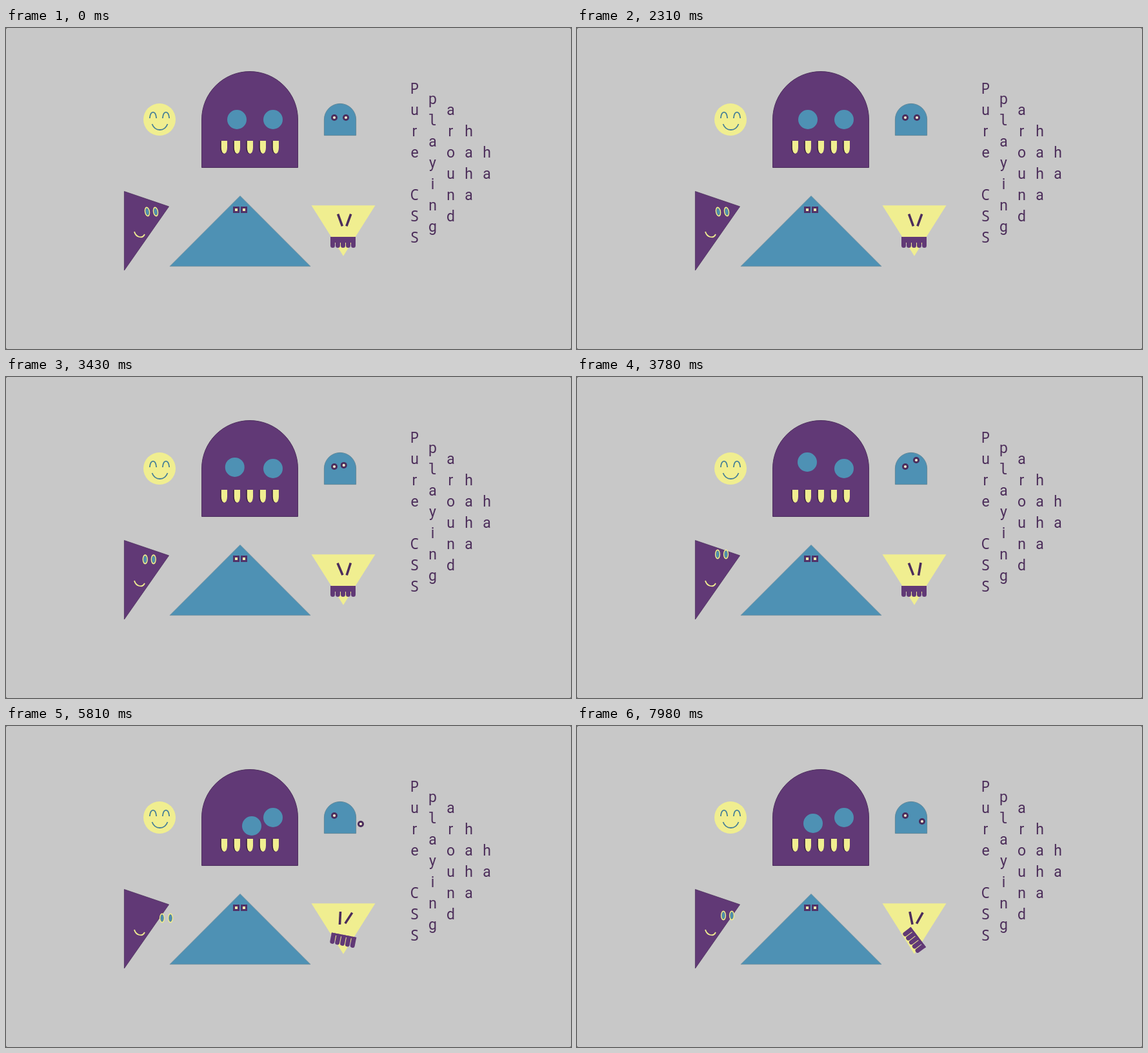
An HTML page with a canvas that plays this animation: 876x498 px, repeating every 8000 ms.

```html
<!DOCTYPE html>
<html lang="en">
<head>
<meta charset="utf-8">
<title>Shape faces</title>
<style>
  html, body { margin: 0; width: 100%; height: 100%; overflow: hidden; background: #c8c8c8; }
  canvas { display: block; }
</style>
</head>
<body>
<canvas id="stage" width="876" height="498"></canvas>
<script>
const ctx = document.getElementById('stage').getContext('2d');
const LOOP = 8000, STEP = 70;
const BACK = '#c8c8c8', PURPLE = '#613976', BLUE = '#4e91b4', YELLOW = '#f0ee90';
const DARK = '#4b2c5c', INK = '#4d2f5b';

// Pointer offset over time: [ms, x, y]
const PATH = [
  [2450, 0, 0], [2940, -7, 11], [3780, -1, -10],
  [4720, 23, 13], [6860, 23, 13], [7980, 8, 9]
];

function offsetAt(t) {
  if (t <= PATH[0][0]) return [0, 0];
  for (let i = 1; i < PATH.length; i++) {
    const [t0, x0, y0] = PATH[i - 1], [t1, x1, y1] = PATH[i];
    if (t <= t1) {
      const p = (t - t0) / (t1 - t0);
      const k = p * p * (3 - 2 * p);
      return [x0 + (x1 - x0) * k, y0 + (y1 - y0) * k];
    }
  }
  return PATH[PATH.length - 1].slice(1);
}

const rad = deg => deg * Math.PI / 180;

function paint(fill, line, width = 1) {
  if (fill) { ctx.fillStyle = fill; ctx.fill(); }
  if (line) { ctx.strokeStyle = line; ctx.lineWidth = width; ctx.stroke(); }
}

function oval(x, y, rx, ry, fill, line, width) {
  ctx.beginPath();
  ctx.ellipse(x, y, rx, ry, 0, 0, Math.PI * 2);
  paint(fill, line, width);
}

function poly(points, fill, line) {
  ctx.beginPath();
  points.forEach(([x, y]) => ctx.lineTo(x, y));
  ctx.closePath();
  paint(fill, line, 0.8);
}

function curve(x0, y0, cx0, cy0, cx1, cy1, x1, y1, color) {
  ctx.beginPath();
  ctx.moveTo(x0, y0);
  ctx.bezierCurveTo(cx0, cy0, cx1, cy1, x1, y1);
  paint(null, color, 1.8);
}

function box(x, y, w, h, radii, fill, line) {
  ctx.beginPath();
  ctx.roundRect(x, y, w, h, radii);
  paint(fill, line);
}

function turned(x, y, deg, draw) {
  ctx.save();
  ctx.translate(x, y);
  ctx.rotate(rad(deg));
  draw();
  ctx.restore();
}

function smiley() {
  const line = '#467f98';
  oval(238, 142, 25, 25, YELLOW);
  for (const x of [228, 248]) curve(x - 5.2, 140, x - 4, 127.5, x + 4, 127.5, x + 5.2, 140, line);
  curve(226.5, 149, 231, 161, 246, 161, 250.5, 149, line);
}

function skull(dx, dy) {
  box(303.5, 67.5, 149, 149, [74.5, 74.5, 0, 0], PURPLE, '#4c2e5c');
  oval(358 + dx, 142 + dy, 15, 15, BLUE);
  oval(414, 142, 15, 15, BLUE);
  for (let x = 333; x < 420; x += 20) {
    const shape = [0, 0, { x: 5, y: 10 }, { x: 5, y: 10 }];
    box(x - 1, 175, 10, 20, shape, '#3d2148');
    box(x + 0.8, 175, 9.2, 20, shape, YELLOW);
  }
}

function ghost(dx, dy) {
  box(493.4, 117.4, 49.2, 49.2, [24.6, 24.6, 0, 0], BLUE, '#5f8799');
  for (const [x, y] of [[509, 139], [527 + dx, 139 + dy]]) {
    oval(x, y, 5, 5, DARK);
    oval(x, y, 2.1, 2.1, '#f3efd0');
  }
}

function wedge(dx, dy, tilt) {
  poly([[183.4, 253.5], [252.5, 277], [183.4, 376]], PURPLE, '#4c2e5c');
  curve(199, 316, 201, 324, 211, 328, 215, 320, YELLOW);
  for (const x of [219, 232]) turned(x + dx, 285 + dy, tilt, () => {
    oval(0, 0, 4.1, 7.6, YELLOW);
    oval(0, 0, 2.2, 5.4, BLUE, '#45677c', 0.7);
  });
}

function mountain() {
  poly([[363, 260.5], [472, 369.7], [254, 369.7]], BLUE, '#6b8d9c');
  for (const x of [352, 364]) {
    box(x, 277, 10, 10, 0, '#513268');
    box(x + 3, 280, 4, 4, 0, '#f3efb0');
  }
}

function comb(angle, notch) {
  turned(522.5, 332.5, angle, () => {
    box(-19.5, -8.5, 39, notch, 0, PURPLE);
    for (let i = 0; i < 5; i++) box(-19.5 + i * 8, -8.5, 7, 17, [0, 0, 3.5, 3.5], PURPLE);
  });
}

function grump(dx, dy, t) {
  poly([[473.5, 275.2], [572.5, 275.2], [523, 353.8]], YELLOW);
  const brow = () => box(-1.8, -10, 3.6, 20, 0, DARK);
  turned(518, 298, dx - 20, brow);
  turned(531.3, 298, dy + 20, brow);
  const angle = Math.max(0, (t - 5240) * 0.0193);
  comb(angle, t < 4500 ? 9 : 3);
}

function column(word, x, y) {
  [...word].forEach((c, i) => {
    const face = /[A-Z]/.test(c) ? '"Noto Sans Mono"' : c === 'l' ? '"DejaVu Sans Mono"' : 'Roboto';
    ctx.font = `23px ${face}, sans-serif`;
    ctx.fillText(c, x, y + i * 33);
  });
}

function words() {
  ctx.fillStyle = INK;
  ctx.textAlign = 'center';
  ctx.textBaseline = 'alphabetic';
  column('Pure CSS', 633.5, 101.5);
  column('playing', 661.5, 118);
  column('around', 689.5, 134.5);
  column('haha', 717.5, 167.5);
  column('ha', 745.5, 200.5);
}

function draw(t) {
  const [dx, dy] = offsetAt(t);
  ctx.fillStyle = '#555';
  ctx.fillRect(0, 0, 876, 498);
  box(0, 0, 876, 498, 2.5, BACK);
  smiley();
  skull(dx, dy);
  ghost(dx, dy);
  wedge(dx, dy, t <= PATH[0][0] ? -10 : 0);
  mountain();
  grump(dx, dy, t);
  words();
}

const start = performance.now();
function tick() {
  const t = (performance.now() - start) % LOOP;
  draw(Math.floor(t / STEP) * STEP);
  requestAnimationFrame(tick);
}
tick();
</script>
</body>
</html>
```
